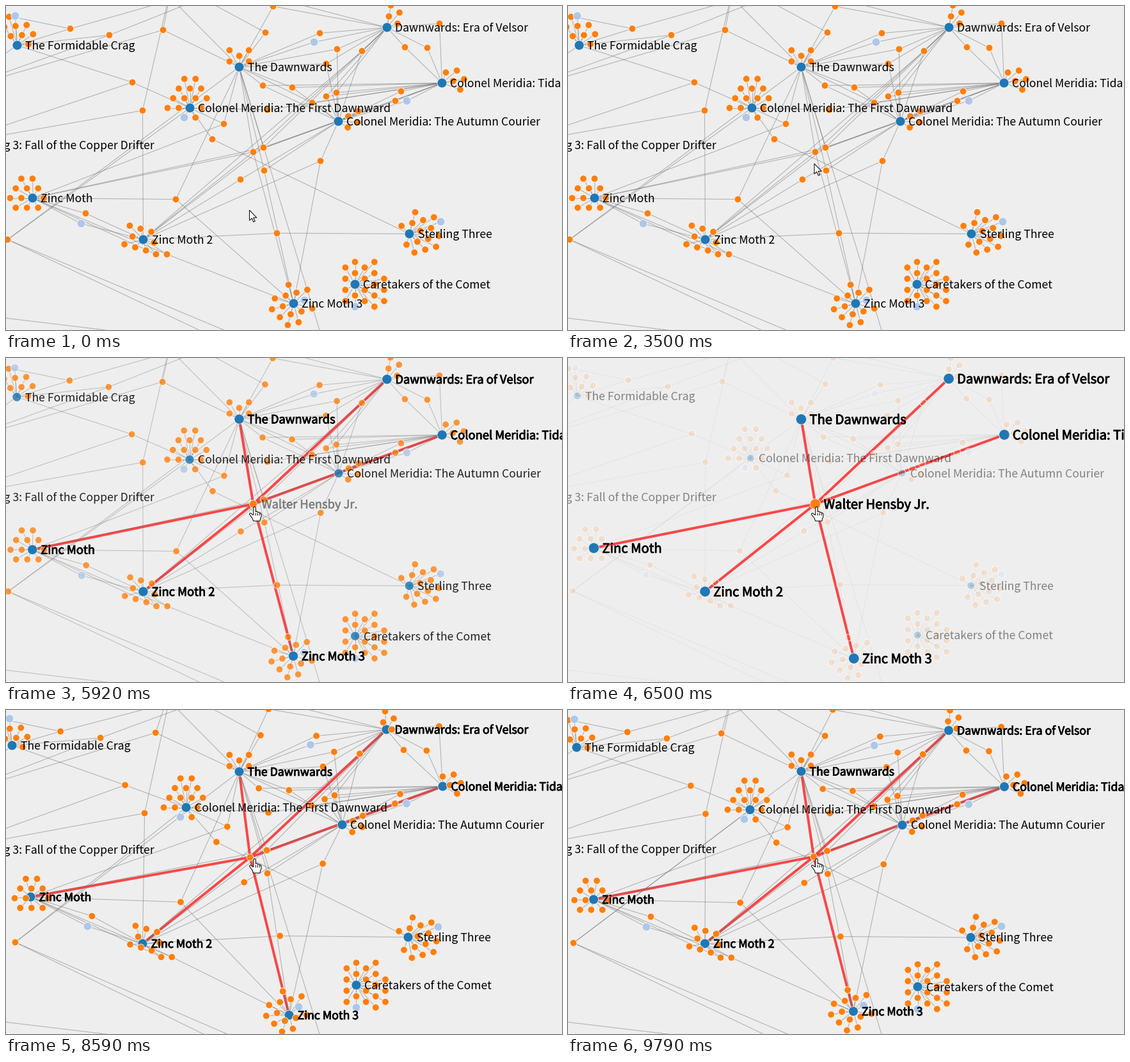
These frames come from a looping animation (869 by 507 pixels, 9890 ms). A matplotlib script:

```python
import numpy as np
import matplotlib.pyplot as plt
from matplotlib.animation import FuncAnimation
from matplotlib.collections import LineCollection
from matplotlib.colors import to_rgb
from matplotlib.patches import Polygon, Rectangle
from matplotlib.patheffects import withStroke

W, H, DPI = 869, 507, 100
PX = 72 / DPI
LOOP, FRAMES = 9890, 230
INTERVAL = LOOP // FRAMES
HOVER, CLICK, RELEASE = 4220, 5920, 8130
LEAD = 140

STEPS = np.concatenate([
    [0], np.linspace(2000, 2960, 8), np.linspace(3110, 4070, 8), [HOVER, 4690, 4810],
    np.linspace(CLICK, 6910, 8), np.linspace(7060, 8000, 8),
    np.linspace(RELEASE, 9140, 8), np.linspace(9290, 9790, 5)])

COLORS = {"hub": "#1f77b4", "actor": "#ff7f0e", "crew": "#aec7e8"}
RADII = {"hub": 7.5, "actor": 5.4, "crew": 6.4}
FADED = {"hub": .25, "actor": .13, "crew": .1}
GREY = (.42, .42, .42)
FONT, FONT_PX = "Noto Sans CJK JP", 17.7
SPACING = 17.5

starts, ends, kinds, links, labels, ids = [], [], [], [], [], {}


def node(kind, start, shift=(0, 0)):
    starts.append(np.array(start, float))
    ends.append(starts[-1] + shift)
    kinds.append(kind)
    return len(kinds) - 1


def hub(key, label, x, y, dx=0, dy=0):
    ids[key] = node("hub", (x, y), (dx, dy))
    labels.append((ids[key], label))


def cluster(key, count, center, tilt, shift=(0, 0), crew=None):
    """Leaves take the free sites of a tilted hexagonal lattice nearest to center."""
    h = ids[key]
    cells = np.mgrid[-6:7, -6:7].reshape(2, -1).T
    angles = np.radians([tilt, tilt + 60])
    sites = SPACING * cells @ np.column_stack([np.cos(angles), np.sin(angles)])
    for taken in [(0, 0)] + ([crew] if crew else []):
        sites = sites[np.hypot(*(sites - taken).T) > 9]
    near = np.argsort(np.hypot(*(sites - center).T))[:count]
    spots = [("actor", s) for s in sites[near]] + ([("crew", crew)] if crew else [])
    for kind, spot in spots:
        links.append((h, node(kind, starts[h] + spot, ends[h] - starts[h] + shift)))


def slide(x, y):
    """The upper part of the net slides left, the lower part right."""
    upper = 1 / (1 + np.exp((y - 150) / 12))
    return (12 - 30 * upper) * (1 - x / 700), -2


def shared(keys, *points, kind="actor"):
    for p in points:
        n = node(kind, p, slide(*p))
        links.extend((ids[k], n) for k in keys)


def anchor(key, x, y):
    ids[key] = node("off", (x, y))


hub("H", "The Formidable Crag", 17, 61, -8, -6)
hub("A", "The Dawnwards", 364, 95, 0, 1)
hub("U", "Dawnwards: Era of Velsor", 595, 33, -1, -3)
hub("C", "Colonel Meridia: Tidal Row", 681, 120, 1, -1)
hub("F", "Colonel Meridia: The First Dawnward", 287, 159, -6, -7)
hub("W", "Colonel Meridia: The Autumn Courier", 519, 180, 6, -1)
hub("I", "Zinc Moth", 41, 300, -3, -8)
hub("J", "Zinc Moth 2", 214, 365, -1, 0)
hub("K", "Zinc Moth 3", 449, 465, -7, 12)
hub("T", "Sterling Three", 630, 356, -2, -1)
hub("G", "Caretakers of the Comet", 545, 435, 2, -5)
hub("S", "Sterling 3: Fall of the Copper Drifter", -93, 217, 0, 1)

cluster("H", 8, (2, -20), -5, shift=(-1, 4), crew=(-3, -46))
cluster("U", 4, (13, -20), -20, shift=(-8, 6))
cluster("C", 5, (24, -8), -10, shift=(-6, 1))
cluster("A", 5, (0, -16), 30)
cluster("F", 13, (-4, -13), 0, crew=(-9, 15))
cluster("W", 4, (21, -5), -27, shift=(1, 2))
cluster("I", 11, (-9, -8), 0, shift=(10, 2))
cluster("J", 8, (-6, 0), 16, shift=(10, -6))
cluster("K", 13, (-3, 3), -15, shift=(-2, -8), crew=(17, -5))
cluster("T", 14, (17, -2), -15, shift=(-2, 3), crew=(49, -19))
cluster("G", 19, (15, 0), 30, crew=(0, 35))

# Far ends of links that leave the stage
anchor("a", -90, 135)
anchor("b", -120, -10)
anchor("c", 400, -50)
anchor("d", 262, -50)
anchor("f", 200, -70)
anchor("g", 480, 565)
anchor("h", 520, 610)
anchor("i", -100, 476)
anchor("j", 300, 524)
anchor("k", 515, 590)
for p, q in ("Af", "Uf", "Ak", "ij", "Ha"):
    links.append((ids[p], ids[q]))

shared("bcH", (100, 35))
shared("acH", (161, 45))
shared("aAd", (245, 37))
shared("HSF", (197, 119))
shared("JSd", (213, 163))
shared("Af", (405, 41))
shared("AU", (417, 0), (490, 42))
shared("AU", (481, 56), kind="crew")
shared("AUW", (500, 90), (517, 67))
shared("UWJ", (556, 70))
shared("UC", (623, 64), (658, 65), (677, 27))
shared("ACW", (401, 124), (447, 127), (478, 151))
shared("WUC", (500, 141), (516, 135))
shared("CW", (617, 133), (608, 148))
shared("CW", (626, 148), kind="crew")
shared("FC", (408, 162))
shared("AFI", (340, 184))
shared("FT", (322, 208))
shared("AUCWIJ", (402, 221))
shared("AKW", (403, 257))
shared("JW", (366, 271))
shared("WKJ", (491, 242))
shared("IKA", (265, 302))
shared("JT", (423, 355))
shared("IJ", (124, 324), (234, 388))
shared("IJ", (117, 340), kind="crew")
shared("IKJ", (251, 388))
shared("AFgh", (2, 365))

STAR = "AUCIJK"
hero = node("actor", (386, 228), (-5, 2))
labels.append((hero, "Walter Hensby Jr."))
lit = {ids[k] for k in STAR} | {hero}

START, END = np.array(starts), np.array(ends)
LINKS = np.array(links)
RAYS = np.array([(ids[k], hero) for k in STAR])
seen = [n for n, kind in enumerate(kinds) if kind != "off"]
focus = np.array([n in lit for n in seen])
fill = np.array([to_rgb(COLORS[kinds[n]]) for n in seen])
radius = np.array([RADII[kinds[n]] for n in seen])
faded = np.where(focus, 1, [FADED[kinds[n]] for n in seen])

plt.rcParams["toolbar"] = "None"
fig = plt.figure(figsize=(W / DPI, H / DPI), dpi=DPI, facecolor="#eeeeee")
ax = fig.add_axes([0, 0, 1, 1])
ax.set(xlim=(-.5, W - .5), ylim=(H - .5, -.5))
ax.axis("off")

red_lines = LineCollection([], zorder=1)
grey_lines = LineCollection([], linewidths=PX, zorder=2)
ax.add_collection(red_lines)
ax.add_collection(grey_lines)
dots = ax.scatter(*START[seen].T, linewidths=PX, zorder=3)

texts = [ax.text(0, 0, label, family=FONT, ha="right" if n == ids["S"] else "left",
                 va="baseline", color="black", zorder=4) for n, label in labels]

tip = [
    ax.add_patch(Rectangle((389, 260), 108, 20, fc="black", ec="none", zorder=5)),
    ax.add_patch(Rectangle((386, 257), 107, 19, fc="white", ec="#767676", lw=PX, zorder=6)),
    ax.text(392, 271, "Walter Hensby Jr.", family="Liberation Sans", size=12 * PX,
            color="#575757", va="baseline", zorder=7)]

ARROW = np.array([(0, 0), (0, 16), (3.7, 12.6), (6.3, 18.4), (8.7, 17.4),
                  (6.2, 11.7), (11.3, 11.7)])
HAND = np.array([(-1.7, 1.3), (0, 0), (1.7, 1.3), (1.7, 8), (4, 7.5), (5, 9), (7, 8.7),
                 (8, 10), (9.5, 10), (10.5, 11.5), (10.5, 16), (9, 19), (8.5, 22.5),
                 (-2, 22.5), (-3, 19), (-5.5, 15.5), (-8, 12), (-7.5, 10.5),
                 (-5.5, 10.5), (-3.2, 12.7), (-1.7, 13)]) + (388, 232)
style = dict(closed=True, fc="white", ec="black", lw=PX, joinstyle="round", zorder=8)
arrow = ax.add_patch(Polygon(ARROW, **style))
hand = ax.add_patch(Polygon(HAND, **style))
knuckles = LineCollection([[(x, 241), (x, 245)] for x in (389.8, 392.8, 395.8)],
                          colors="black", linewidths=PX, zorder=9)
ax.add_collection(knuckles)


def layout(t):
    drift = np.interp(t, [CLICK - LEAD, 7600, 8560, 9790], [0, 1, 1, .5])
    pos = START + drift * (END - START)
    if t < RELEASE:
        pos[hero] = START[hero]
    return pos


def ramp(t, begin):
    return np.clip((t - begin + LEAD) / (4 * LEAD), 0, 1)


def draw_net(pos, hover, dim):
    grey_lines.set_segments(pos[LINKS])
    grey_lines.set_color([(*GREY, .5 * (1 - .85 * dim))])
    red_lines.set_segments(pos[RAYS])
    red_lines.set_color([(1, 0, 0, .7) if hover else (*GREY, .5)])
    red_lines.set_linewidth((4 if hover else 1) * PX)

    r = radius + dim * np.where(focus, .8, np.minimum(6 - radius, 0))
    r[-1] += 2 * dim
    dots.set_offsets(pos[seen])
    dots.set_sizes((2 * r * PX) ** 2)
    dots.set_facecolor(np.column_stack([fill, 1 + (faded - 1) * dim]))
    rim = np.ones((len(seen), 4))
    rim[:, 3] = .75
    dots.set_edgecolor(rim)


def draw_labels(pos, hover, dim):
    for (n, _), text in zip(labels, texts):
        bold = hover and n in lit
        scale = 1 + .14 * dim if bold else 1
        gap = 324 if n == ids["S"] else 13
        text.set_position(pos[n] + (gap, 6.5 * scale))
        text.set_fontsize(FONT_PX * PX * scale)
        text.set_path_effects([withStroke(linewidth=.6, foreground="black")] if bold else [])
        text.set_alpha(dim if n == hero else 1 if bold else 1 - .55 * dim)


def draw(i):
    now = (i + 1) * INTERVAL - 1
    t = STEPS[np.searchsorted(STEPS, now, side="right") - 1]
    hover = t >= HOVER
    dim = ramp(t, CLICK) - ramp(t, RELEASE)
    pos = layout(t)
    draw_net(pos, hover, dim)
    draw_labels(pos, hover, dim)

    shown = np.clip((t - 4570) / 240, 0, 1) if t < CLICK else 0
    for part, strength in zip(tip, (.4, 1, 1)):
        part.set_alpha(shown * strength)

    arrow.set_xy(ARROW + (np.interp(t, [1860, 4070], [380, 386]),
                          np.interp(t, [1860, 2960, 4070], [319, 260, 233])))
    arrow.set_visible(not hover)
    hand.set_visible(hover)
    knuckles.set_visible(hover)
    return []


anim = FuncAnimation(fig, draw, frames=FRAMES, init_func=lambda: draw(0),
                     interval=INTERVAL, repeat=True, repeat_delay=0,
                     cache_frame_data=False)
plt.show()
```
